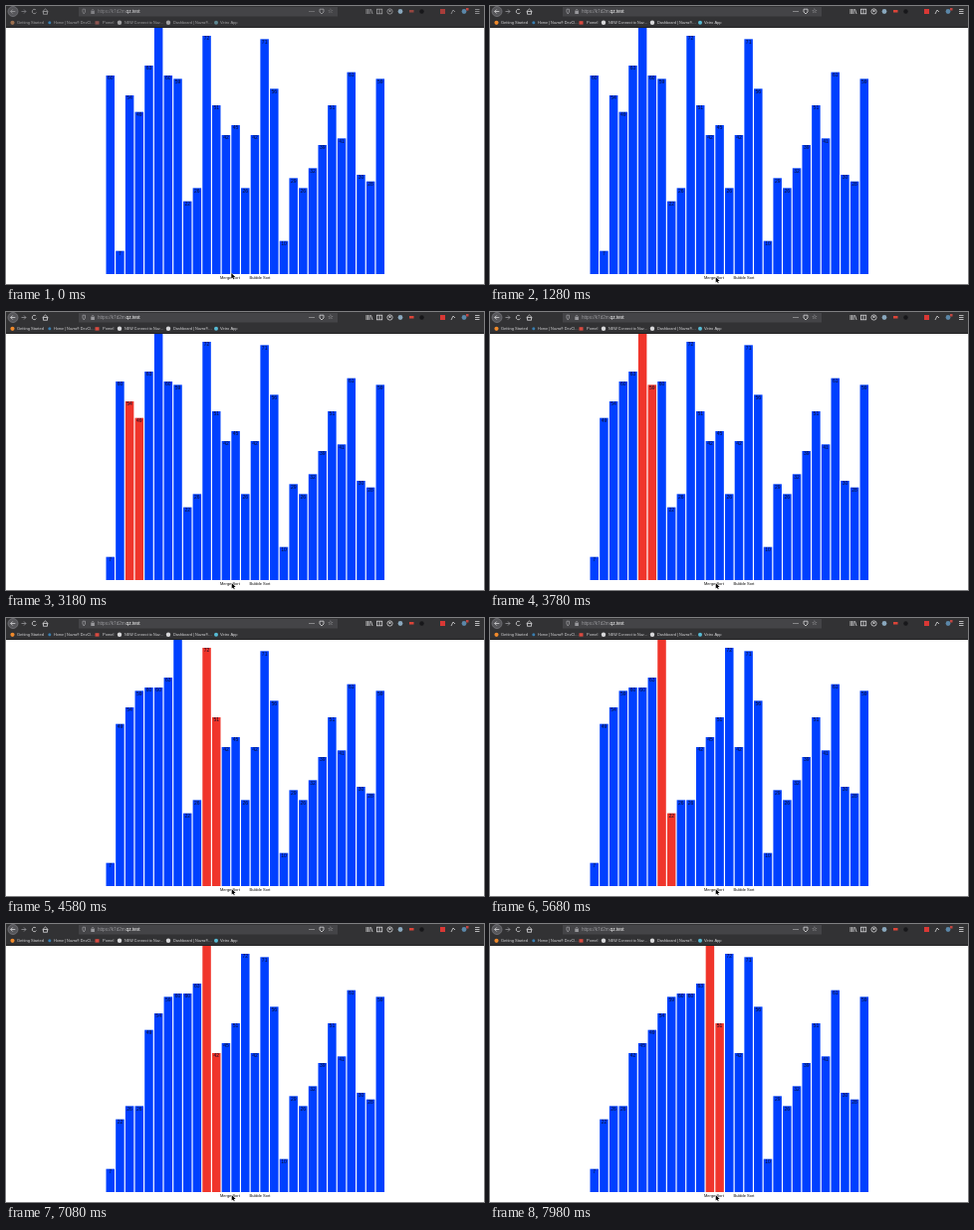
Recreate the animation shown at these times as an HTML page with a canvas. Size 480 by 280 pixels, loop 8000 ms.

```html
<!DOCTYPE html>
<html lang="en">
<head>
<meta charset="utf-8">
<title>Merge sort</title>
<style>
html, body { margin: 0; width: 100%; height: 100%; overflow: hidden; background: #fff; }
canvas { display: block; width: 480px; height: 280px; }
</style>
</head>
<body>
<canvas id="stage"></canvas>
<script>
const W = 480, H = 280, LOOP = 8000;
const SORT_START = 2914, STEP = 52.5, FOCUS_AT = 980;
const BASE = 270, UNIT = 10 / 3, LEFT = 100.5, PITCH = 9.68, BAR = 8.5;
const FONT = '"Liberation Sans", Arial, sans-serif';
const START = [60, 7, 54, 49, 63, 80, 60, 59, 22, 26, 72, 51, 42, 45, 26,
  42, 71, 56, 10, 29, 26, 32, 39, 51, 41, 61, 30, 28, 59];

const canvas = document.getElementById('stage');
const ratio = window.devicePixelRatio || 1;
canvas.width = W * ratio;
canvas.height = H * ratio;
const ctx = canvas.getContext('2d');
ctx.scale(ratio, ratio);

// In-place merge sort, recording each comparison and shift
function record(values) {
  const a = values.slice(), steps = [];
  const show = (i, j) => steps.push({ values: a.slice(), pair: [i, j] });

  function merge(lo, mid, hi) {
    let right = mid + 1;
    show(mid, right);
    if (a[mid] <= a[right]) return;
    while (lo <= mid && right <= hi) {
      show(lo, right);
      if (a[lo] > a[right]) {
        for (let k = right; k > lo; k--) {
          show(k - 1, k);
          [a[k - 1], a[k]] = [a[k], a[k - 1]];
        }
        mid++;
        right++;
      }
      lo++;
    }
  }

  function sort(lo, hi) {
    if (lo >= hi) return;
    const mid = (lo + hi) >> 1;
    sort(lo, mid);
    sort(mid + 1, hi);
    merge(lo, mid, hi);
  }

  sort(0, a.length - 1);
  return steps;
}

const steps = record(START);
const idle = { values: START, pair: [] };

function rect(x, y, w, h, color) {
  ctx.fillStyle = color;
  ctx.fillRect(x, y, w, h);
}

function dot(x, y, r, color) {
  ctx.fillStyle = color;
  ctx.beginPath();
  ctx.arc(x, y, r, 0, Math.PI * 2);
  ctx.fill();
}

function ring(x, y, r, color, from = 0, to = Math.PI * 2) {
  ctx.strokeStyle = color;
  ctx.beginPath();
  ctx.arc(x, y, r, from, to);
  ctx.stroke();
}

function line(color, ...p) {
  ctx.strokeStyle = color;
  ctx.beginPath();
  for (let i = 0; i < p.length; i += 2) ctx.lineTo(p[i], p[i + 1]);
  ctx.stroke();
}

function text(s, x, y, size, color, align = 'left', weight = '') {
  ctx.font = `${weight} ${size}px ${FONT}`;
  ctx.textAlign = align;
  ctx.textBaseline = 'middle';
  ctx.fillStyle = color;
  ctx.fillText(s, x, y);
}

function drawBars({ values, pair }) {
  values.forEach((v, i) => {
    const x = LEFT + i * PITCH, y = BASE - v * UNIT;
    rect(x, y, BAR, BASE - y, pair.includes(i) ? '#f0352b' : '#0040ff');
    text(v, x + BAR / 2, y + 3, 5, '#0a0e28', 'center');
  });
}

function drawToolbar(focused) {
  const ink = focused ? '#d8d8da' : '#a0a0a2';
  const dim = focused ? '#98989c' : '#808084';
  rect(0, 0, W, 22, '#323234');
  rect(73, 1, 260, 9.5, '#444447');
  rect(0, 21, W, 1, '#202022');
  ctx.lineWidth = 0.8;

  // Navigation
  dot(7, 5.5, 5, '#56565a');
  ring(7, 5.5, 5, '#77777b');
  line(ink, 9.3, 5.5, 4.7, 5.5, 6.7, 3.5);
  line(ink, 4.7, 5.5, 6.7, 7.5);
  line(dim, 15.5, 5.5, 20, 5.5, 18, 3.5);
  line(dim, 20, 5.5, 18, 7.5);
  ring(28.5, 5.5, 2.2, ink, 0.5, 5.5);
  line(ink, 36.5, 5.8, 39.5, 3, 42.5, 5.8);
  ctx.strokeRect(37.6, 5.4, 3.8, 2.8);

  // Address field
  line(dim, 77, 3.2, 79.5, 3.2, 79.5, 6, 78.2, 8, 77, 6, 77, 3.2);
  rect(85.3, 5, 3.6, 3, dim);
  ring(87.1, 4.8, 1.2, dim, Math.PI, 0);
  text('https://k7d2m.', 92, 5.8, 4.6, dim);
  text('qz.test', 120.5, 5.8, 4.8, focused ? '#fff' : '#e2e2e4');
  for (let i = 0; i < 3; i++) dot(305 + i * 2, 5.5, 0.6, ink);
  line(ink, 315, 3.2, 319, 3.2, 319, 6, 317, 8, 315, 6, 315, 3.2);
  text('☆', 326, 5.5, 6.5, ink, 'center');

  // Tools
  for (let i = 0; i < 3; i++) line(ink, 362 + i * 1.6, 3, 362 + i * 1.6, 8);
  line(ink, 366.5, 3.2, 368, 8);
  ctx.strokeRect(372.5, 3.2, 5.2, 4.6);
  line(ink, 375, 3.2, 375, 7.8);
  ring(385.5, 5.5, 2.6, ink);
  dot(385.5, 5, 1, ink);
  dot(396, 5.5, 2.4, '#89a7bd');
  rect(405, 4, 4.5, 2.5, focused ? '#db4438' : '#964640');
  dot(417.5, 5.5, 2.2, '#17171a');
  rect(436, 3, 5, 5, focused ? '#d93835' : '#a83d3a');
  line(ink, 447, 8, 449, 4, 451, 6);
  dot(460, 5.5, 2.4, '#5b87a8');
  rect(462, 2, 2.5, 2.5, '#c24642');
  for (let i = 0; i < 3; i++) line(ink, 471, 3.5 + i * 2, 475.5, 3.5 + i * 2);

  // Bookmarks
  dot(6.5, 16.8, 2.1, focused ? '#f08a2b' : '#9c7050');
  text('Getting Started', 11, 17, 4, ink);
  dot(43.8, 16.8, 1.5, '#397eb0');
  text('Home | Nuvra® DevCl…', 48, 17, 3.75, ink);
  rect(89.5, 15.2, 4, 3.4, focused ? '#d94a40' : '#8c5450');
  text('Pomel', 97, 17, 4, ink);
  dot(114, 16.8, 2.2, ink);
  text('NEW Connect to Nuv…', 119, 17, 3.75, ink);
  dot(163, 16.8, 2.2, ink);
  text('Dashboard | Nuvra®…', 168, 17, 3.85, ink);
  dot(211, 16.8, 2, focused ? '#57bcd6' : '#5d8791');
  text('Vetro App', 215, 17, 4, ink);
}

function drawCursor(x, y) {
  ctx.beginPath();
  [[0, 0], [0, 5.6], [1.3, 4.4], [2.2, 6.3], [3, 5.9], [2.1, 4.1], [3.9, 4]]
    .forEach(([dx, dy]) => ctx.lineTo(x + dx, y + dy));
  ctx.closePath();
  ctx.strokeStyle = '#fff';
  ctx.lineWidth = 0.9;
  ctx.stroke();
  ctx.fillStyle = '#000';
  ctx.fill();
}

function draw(time) {
  // The picture refreshes every 100 ms, first at 80 ms
  const t = Math.max(0, Math.floor((time - 80) / 100) * 100 + 80);
  const n = Math.floor((t - SORT_START) / STEP);
  const move = Math.min(1, t / 880);

  rect(0, 0, W, H, '#fff');
  drawBars(n < 0 ? idle : steps[Math.min(n, steps.length - 1)]);
  drawToolbar(t >= FOCUS_AT);
  text('Merge Sort', 215, 274, 4, '#000');
  text('Bubble Sort', 244.5, 274, 4, '#000');
  drawCursor(226.3 + 0.4 * move, 269 + 4 * move);
}

const begin = performance.now();
function tick() {
  draw((performance.now() - begin) % LOOP);
  requestAnimationFrame(tick);
}
tick();
</script>
</body>
</html>
```
